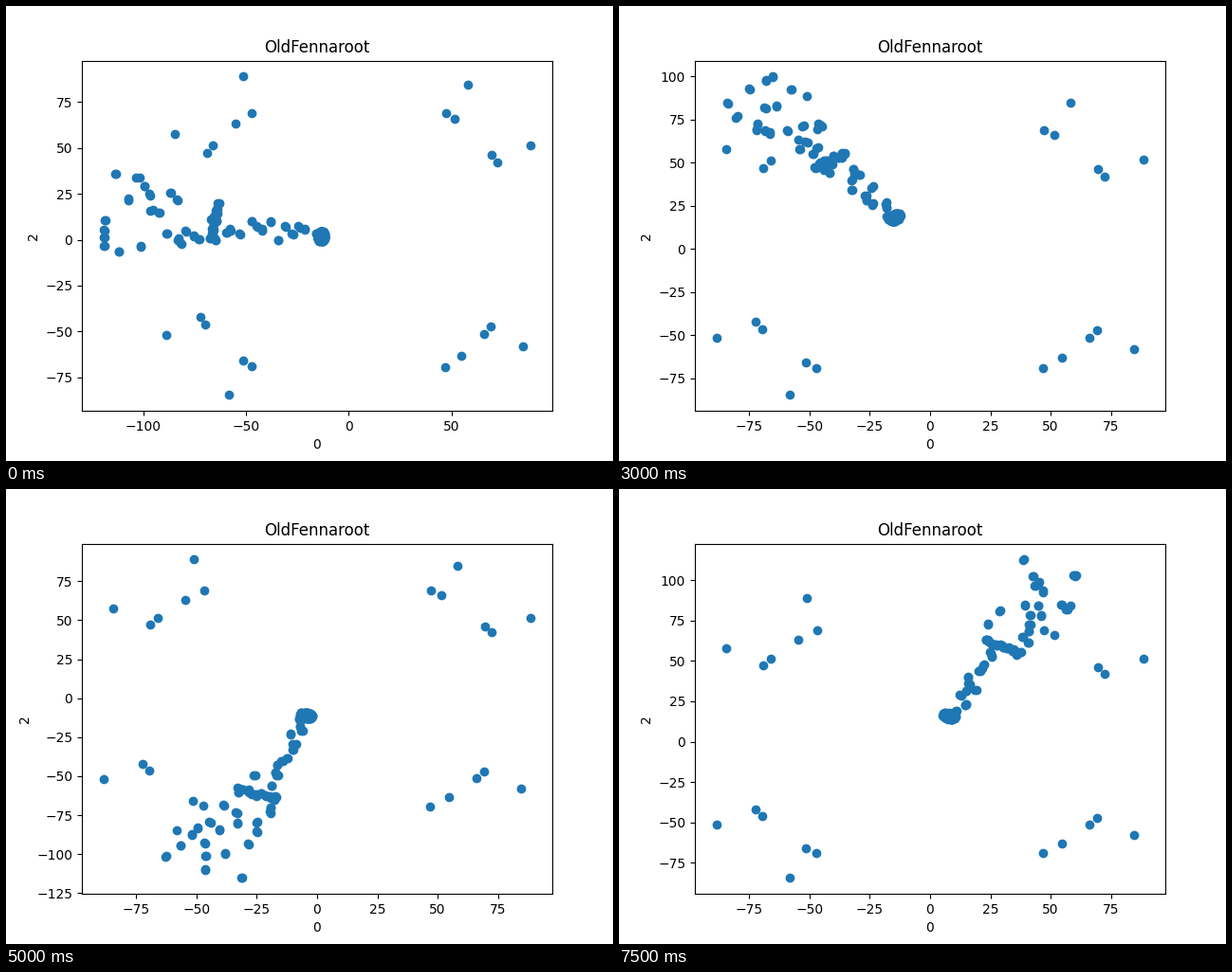
Animation, 640 px wide and 480 px high, one loop 8000 ms. Source, as a matplotlib script:

```python
import matplotlib.pyplot as plt
import numpy as np
from matplotlib.animation import FuncAnimation

TITLE = "OldFennaroot"
INNER, OUTER = 83.7, 102.7  # radii of the hits that never move
ARC, RIM = 66.5, 119.5      # dense shell and outermost shell of a spray


def polar(radius, degrees):
    angle = np.radians(degrees)
    return np.column_stack([radius * np.cos(angle), radius * np.sin(angle)])


def fixed_hits():
    """Two rings with half-turn symmetry; one outer hit is absent."""
    inner = np.array([30.2, 33.6, 52, 55.6, 124.2, 131, 142.1, 145.7])
    outer = np.array([30.2, 55.5, 145.7, 120])
    inner = np.concatenate([inner, inner + 180])
    outer = np.concatenate([outer, outer[:-1] + 180])
    return np.vstack([polar(INNER, inner), polar(OUTER, outer)])


# Angle range of the spray, radius of its core, angles of its hits on the rim.
SPRAYS = [
    (161.5, 183.5, 13.4, (162.5, 175, 177.5, 179.3, 181.5)),
    (38, 56, 16, (39.7, 45, 49, 54)),
    (168, 184, 17, (170, 172, 174, 178.5, 180.5, 181.4)),
    (-86, -66, 14, (-83, -77, -69)),
    (-110, -91, 18, (-107, -102, -94)),
    (86, 105, 15, (88, 97, 103)),
    (121, 137, 23.5, (123.2, 124.8, 128.9, 134.8)),
    (-71, -53, 16, (-69, -63, -55)),
    (-59, -38, 14.5, (-59.5, -49.2, -46.3, -41.1)),
    (163, 181, 17, (165, 171, 179)),
    (-121, -103, 12, (-121.8, -112.9, -105.2)),
    (-120, -101, 15, (-118, -111, -103)),
    (129, 146, 18, (129.9, 136, 144)),
    (-145, -129, 24.2, (-142.7, -137.6, -135.7, -131.5)),
    (177, 195, 16, (179, 186, 193)),
    (55, 72, 17.8, (59.5, 60, 71)),
]


def core_hits(rng, radius, heading, count=160):
    """A filled oval, wider across the heading than along it."""
    reach = np.sqrt(rng.uniform(0, 1, count))
    turn = rng.uniform(0, 2 * np.pi, count)
    along = radius + 1.9 * reach * np.cos(turn)
    across = 2.9 * reach * np.sin(turn)
    return polar(np.hypot(along, across),
                 heading + np.degrees(np.arctan2(across, along)))


def clump_hits(rng, low, high, core):
    """Pairs of hits: a thin tail, the dense arc, then the wide spray."""
    tail = np.linspace(core + 4, 60, 13) + rng.normal(0, 1, 13)
    arc = rng.normal(ARC, 1, 14)
    wide = np.linspace(73, 112, 16) + rng.uniform(-1, 1, 16)
    middle, half = (low + high) / 2, (high - low) / 2
    angles = middle + half * np.concatenate([
        rng.uniform(-.75, .75, tail.size),
        np.linspace(-.85, .8, arc.size) + rng.normal(0, .06, arc.size),
        rng.uniform(-1, 1, wide.size)])
    clumps = polar(np.concatenate([tail, arc, wide]), angles)
    return np.vstack([clumps, clumps + rng.normal(0, .45, clumps.shape)])


def hits(index):
    rng = np.random.default_rng(index)
    low, high, core, rim = SPRAYS[index]
    return np.vstack([
        FIXED, polar(RIM, rim), polar(RIM - .5, rim),
        core_hits(rng, core, (low + high) / 2),
        clump_hits(rng, low, high, core)])


FIXED = fixed_hits()
fig, ax = plt.subplots(figsize=(6.4, 4.8), dpi=100)


def draw(index):
    ax.clear()
    ax.scatter(*hits(index).T)
    ax.set_title(TITLE)
    ax.set_xlabel("0")
    ax.set_ylabel("2")


anim = FuncAnimation(fig, draw, frames=len(SPRAYS), interval=500,
                     init_func=lambda: None, repeat=True, repeat_delay=0)
plt.show()
```
